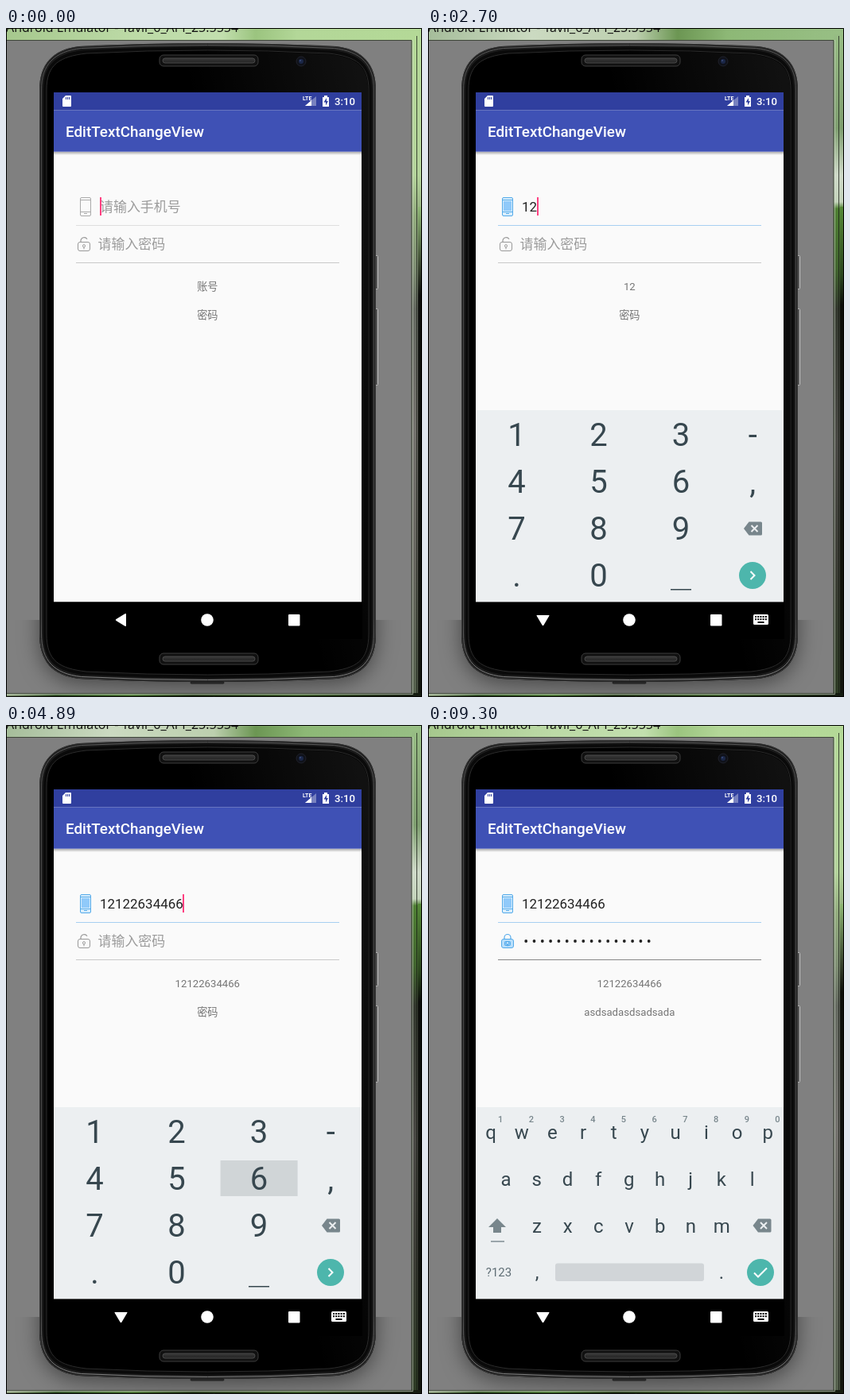
Recreate the animation shown at these times as an HTML page with a canvas. Size 523 by 842 pixels, loop 9.33 s.

```html
<!DOCTYPE html>
<html lang="zh-CN">
<head>
<meta charset="utf-8">
<title>EditTextChangeView</title>
<style>
html, body { margin: 0; width: 100%; height: 100%; overflow: hidden; background: #808080; }
canvas { display: block; width: 523px; height: 842px; }
</style>
</head>
<body>
<canvas id="stage" width="523" height="842"></canvas>
<script>
const ctx = document.getElementById('stage').getContext('2d');
const LOOP = 9330;
const SANS = 'Roboto, "Noto Sans CJK SC", "Noto Sans CJK", sans-serif';
const INK = '#37474f', KEY_GREY = '#78868c', TEAL = '#4db6ac', PINK = '#ff4081';
const PHONE = '12122634466', PASSWORD = 'asdsadasdsadsada';
const NAV_TOP = 722.5;

// [key, pressed at, released at]
const PRESSES = [
  ['1', 2070, 2130], ['2', 2640, 2700], ['1', 2970, 3030], ['2', 3360, 3420],
  ['2', 3570, 3660], ['6', 3750, 3810], ['3', 3930, 3990], ['4', 4080, 4140],
  ['4', 4290, 4350], ['6', 4440, 4500], ['6', 4590, 4650], ['4', 4740, 4800], ['6', 4890, 4950]
];
const CARET_FLIPS = [270, 720, 930, 1380, 1830, 2130, 2580, 2700, 5880, 6000,
  7590, 8040, 8490, 8940, 9210];
const FOCUS_MOVE = 5430, LETTERS_SHOWN = 5490, LAST_HIDDEN = 8490;
const NUM_ROWS = ['123-', '456,', '789', '.0'];
const NUM_X = [111.5, 214.5, 318, 408.3];
const rowY = r => 512 + 59 * r;

const ramp = (t, a, b) => Math.min(1, Math.max(0, (t - a) / (b - a)));

function rect(x, y, w, h, fill) {
  ctx.fillStyle = fill;
  ctx.fillRect(x, y, w, h);
}

function box(x, y, w, h, r, fill, stroke, width = 1) {
  ctx.beginPath();
  ctx.roundRect(x, y, w, h, r);
  paint(fill, stroke, width);
}

function circle(x, y, r, fill, stroke, width = 1) {
  ctx.beginPath();
  ctx.arc(x, y, r, 0, Math.PI * 2);
  paint(fill, stroke, width);
}

function shape(d, fill, stroke, width = 1) {
  const path = new Path2D(d);
  if (fill) { ctx.fillStyle = fill; ctx.fill(path); }
  if (stroke) { ctx.strokeStyle = stroke; ctx.lineWidth = width; ctx.stroke(path); }
}

function paint(fill, stroke, width) {
  if (fill) { ctx.fillStyle = fill; ctx.fill(); }
  if (stroke) { ctx.strokeStyle = stroke; ctx.lineWidth = width; ctx.stroke(); }
}

function text(str, x, y, size, fill, align = 'left', weight = 400, family = SANS) {
  ctx.font = `${weight} ${size}px ${family}`;
  ctx.textAlign = align;
  ctx.fillStyle = fill;
  ctx.fillText(str, x, y);
}

function gradient(x0, y0, x1, y1, stops) {
  const g = ctx.createLinearGradient(x0, y0, x1, y1);
  stops.forEach(([at, color]) => g.addColorStop(at, color));
  return g;
}

function glass(focused) {
  const top = focused
    ? [[0, '#a5bd9a'], [.25, '#cbdac1'], [.5, '#bccfae'], [.6, '#6c9653'], [.72, '#8db876'], [1, '#98bf85']]
    : [[0, '#a6c88d'], [.3, '#bcdaa6'], [.52, '#c2dfae'], [.6, '#9bc47f'], [.7, '#b3d798'], [1, '#b4d997']];
  const side = focused
    ? [[0, '#98bf85'], [.08, '#8cac7b'], [.15, '#7f9f70'], [.22, '#cfdac9'], [.26, '#c3d3ba'],
       [.27, '#4f8034'], [.36, '#42652f'], [.42, '#34392f'], [.62, '#4a4945'], [.8, '#3c3d36'], [1, '#2e3c25']]
    : [[0, '#b4d997'], [.22, '#b4d49b'], [.28, '#93ad7e'], [.36, '#7f8f74'], [.42, '#656a61'],
       [.6, '#74726e'], [.8, '#66665f'], [1, '#55614d']];
  const bottom = [[0, '#91a382'], [.12, '#35542a'], [.3, '#4d7738'], [.45, '#2a3d20'], [.7, '#3d5c2c'], [1, '#141a10']];
  rect(0, 0, 523, 16, gradient(0, 0, 523, 0, top));
  rect(510, 8, 13, 834, gradient(0, 0, 0, 842, side));
  rect(518, 225, 5, 617, gradient(0, 225, 0, 842, focused
    ? [[0, '#568a38'], [.14, '#2b451e'], [.2, '#0b0d0a'], [1, '#12150f']]
    : [[0, '#90b876'], [.12, '#39452f'], [.18, '#0d0f0c'], [1, '#12150f']]));
  rect(0, 837, 523, 5, gradient(0, 0, 523, 0, bottom));
}

function desktop(focus) {
  glass(false);
  if (focus > 0) {
    ctx.globalAlpha = focus;
    glass(true);
    ctx.globalAlpha = 1;
  }
  text('Android Emulator - Tavil_6_API_25:5554', 0, 5, 16, '#101010', 'left', 400, '"Open Sans", sans-serif');
  rect(1, 16, 509, 821, '#808080');
  box(.5, 15.5, 509.5, 822, 0, null, '#3e4639');
  rect(1, 838, 510, 1, 'rgba(225,235,220,.6)');
  rect(511, 15, 1, 824, 'rgba(225,235,220,.5)');
  rect(516, 10, 1, 832, 'rgba(20,25,18,.75)');
  box(.5, .5, 522, 841, 0, null, '#000');
}

function speaker(y) {
  box(193, y, 124, 14, 5, '#111', '#3d3d3d');
  box(197, y + 4, 116, 6, 3, gradient(0, y + 4, 0, y + 10, [[0, '#383838'], [1, '#242424']]), '#484848');
}

// Phone outline, drawn inset from its outer edge.
function outline(inset) {
  const l = 42 + inset, r = 465 - inset, t = 23 + inset, b = 819 - inset;
  return `M${l} 78C${l} 46 ${l + 16} ${t + 4} ${l + 50} ${t}Q253.5 ${t - 8} ${r - 50} ${t}` +
    `C${r - 16} ${t + 4} ${r} 46 ${r} 78V762C${r} 797 ${r - 16} ${b - 4} ${r - 50} ${b}` +
    `Q253.5 ${b + 8} ${l + 50} ${b}C${l + 16} ${b - 4} ${l} 797 ${l} 762Z`;
}

function handset() {
  ctx.save();
  ctx.beginPath();
  ctx.rect(1, 745, 509, 92);
  ctx.clip();
  ctx.shadowColor = 'rgba(0,0,0,.45)';
  ctx.shadowBlur = 26;
  ctx.shadowOffsetY = 6;
  shape(outline(0), '#111');
  ctx.restore();
  [[286, 42], [353, 96]].forEach(([y, h]) => box(464.5, y + .5, 3, h, 1, '#555', '#c4c4c4'));
  shape(outline(0), '#1b1b1b');
  shape(outline(.5), null, '#3a3a3a');
  shape(outline(2.5), null, gradient(0, 20, 0, 822, [[0, '#5c5c5c'], [.1, '#4a4a4a'], [.9, '#4a4a4a'], [1, '#858585']]));
  shape(outline(5), '#0a0a0a');
  shape(outline(9), '#000', '#2b2b2b');
  shape(outline(10), gradient(230, 80, 450, 30, [[0, 'rgba(255,255,255,0)'], [1, 'rgba(255,255,255,.07)']]));
  box(232, 823, 42, 2, 1, '#333', '#191919');
  speaker(34);
  speaker(787);
  circle(371, 42, 6, '#10121a', '#20222b');
  circle(371, 42, 3, '#1b2747');
  circle(370, 41, 1, '#3b4c79');
}

function appBars() {
  rect(60, 81, 387, NAV_TOP - 81, '#fafafa');
  rect(60, 156, 387, 4, gradient(0, 156, 0, 160, [[0, 'rgba(0,0,0,.3)'], [1, 'rgba(0,0,0,0)']]));
  rect(60, 81, 387, 22.5, '#303f9f');
  rect(60, 103.5, 387, 52.2, '#3f51b5');
  text('EditTextChangeView', 75, 136.7, 18.83, '#fff', 'left', 500);
  shape('M75 85H81Q82 85 82 86V98Q82 99 81 99H72Q71 99 71 98V89Z', '#fff');
  [75, 77, 79].forEach(x => rect(x, 87, 1, 3, '#303f9f'));
  text('LTE', 373, 91, 7, '#fff', 'left', 700);
  shape('M390 86V98H376Z', 'rgba(255,255,255,.35)');
  shape('M384 91V98H376Z', '#fff');
  shape('M400 85H404V87H406V99H398V87H400Z', '#fff');
  shape('M403 88L399.5 93.5H402V97.5L405 92H403Z', '#303f9f');
  text('3:10', 439, 97, 13.18, '#fff', 'right', 500);
}

function phoneIcon(active) {
  const line = active ? '#53aaea' : '#aaa';
  box(93.5, 213.5, 13, 23, 1.5, active ? '#d9eefc' : null, line);
  rect(94, 216, 12, 1, line);
  rect(94, 231, 12, 1, line);
  if (active) rect(95, 218, 10, 12, '#90cafa');
  rect(98, 233, 4, 1, line);
}

function lockIcon(active) {
  const line = active ? '#53aaea' : '#999';
  const x = active ? 92.5 : 90.5;
  box(x, 269.5, 15, 11, 2.5, active ? '#b9dffb' : null, line);
  shape(active ? 'M96 269V267.5A4 4 0 0 1 104 267.5V269' : 'M94 269V267.5A4.3 4.3 0 0 1 102 265.8', null, line, 1.2);
  if (active) box(96.5, 272.5, 7, 5, 1, '#86c5f8', line);
  circle(x + 7.5, 274.3, 1.6, active ? '#e5f4ff' : null, line);
  rect(x + 7, 276, 1, 2.5, line);
}

function maskedWidth(value, hidden) {
  return hidden * 10.3 + (hidden < value.length ? 9.2 : 0);
}

function form(t, number, secret) {
  phoneIcon(number);
  lockIcon(secret);
  rect(88, 248, 331, 1, number ? '#a6cff1' : '#dedede');
  rect(88, 295, 331, 1, secret ? '#868686' : '#c9c9c9');
  text(number || '请输入手机号', 118, 231, 16.94, number ? '#212121' : '#9b9b9b');
  const numberWidth = number ? ctx.measureText(number).width : 0;

  const hidden = t >= LAST_HIDDEN ? secret.length : Math.max(0, secret.length - 1);
  if (secret) {
    for (let i = 0; i < hidden; i++) circle(123.2 + i * 10.3, 272, 1.9, '#212121');
    text(secret.slice(hidden), 118 + hidden * 10.3, 278, 16.94, '#212121');
  } else {
    text('请输入密码', 115.5, 278, 16.94, '#9b9b9b');
  }
  text(number || '账号', 253.3, 329.6, 13.18, '#757575', 'center');
  text(secret || '密码', 253.3, 366, 13.18, '#757575', 'center');

  if (CARET_FLIPS.filter(f => f <= t).length % 2 === 0) {
    if (t < FOCUS_MOVE) rect(Math.floor(118 + numberWidth), 213, 2, 23, PINK);
    else rect(secret ? Math.round(118 + maskedWidth(secret, hidden)) - 1 : 116, 260, 2, 23, PINK);
  }
}

function backspace(x, y) {
  shape(`M${x - 11.5} ${y}L${x - 5} ${y - 8.5}H${x + 10}Q${x + 11.5} ${y - 8.5} ${x + 11.5} ${y - 7}V${y + 7}Q${x + 11.5} ${y + 8.5} ${x + 10} ${y + 8.5}H${x - 5}Z`, KEY_GREY);
  shape(`M${x - 2} ${y - 4}l8 8m0 -8l-8 8`, null, '#eceff1', 2);
}

function numberPad(t) {
  const press = PRESSES.find(p => t >= p[1] && t < p[2]);
  if (press) {
    const k = press[0] - 1;
    rect(63 + 103.3 * (k % 3), 489 + 59 * Math.floor(k / 3), 97, 45, '#d0d5d7');
  }
  NUM_ROWS.forEach((row, r) => [...row].forEach((c, i) =>
    text(c, NUM_X[i], rowY(r) + 14, 40, INK, 'center')));
  rect(305, 706, 26, 1.5, INK);
  backspace(408.5, 630);
  circle(408, 689, 17, t >= 5400 ? '#429d94' : TEAL);
  shape('M405.5 684L410.5 689L405.5 694', null, '#fff', 2);
}

function letterPad() {
  [['qwertyuiop', 79], ['asdfghjkl', 98], ['zxcvbnm', 137]].forEach(([row, x], r) =>
    [...row].forEach((c, i) => text(c, x + 38.7 * i, rowY(r) + 8.5, 24, INK, 'center')));
  [...'1234567890'].forEach((c, i) => text(c, 91.2 + 38.7 * i, 500, 11, KEY_GREY, 'center', 500));
  shape('M87 621L98 632H92V639H82V632H76Z', KEY_GREY);
  rect(79, 649, 17, 2, '#9aa5aa');
  backspace(420, 630);
  text('?123', 89, 694, 15, '#5f6e75', 'center');
  text(',', 137, 697, 24, INK, 'center');
  box(160, 677.5, 187, 22.5, 3, '#d1d5d8');
  text('.', 369, 697, 24, INK, 'center');
  circle(418, 689, 17, TEAL);
  shape('M410 689.5L415 694.5L426 683.5', null, '#fff', 2);
}

function keyboard(t) {
  const p = ramp(t, 780, 1110);
  if (p === 0) return;
  ctx.save();
  ctx.beginPath();
  ctx.rect(60, 481, 387, NAV_TOP - 481);
  ctx.clip();
  ctx.globalAlpha = p;
  ctx.translate(0, 48 * (1 - p) ** 2);
  rect(60, 481, 387, 242, '#eceff1');
  t < LETTERS_SHOWN ? numberPad(t) : letterPad();
  ctx.restore();
}

function navBar(open) {
  rect(60, NAV_TOP, 388, 769 - NAV_TOP, '#000');
  shape(open ? 'M137 739H152Q153 739 152.3 740L145.5 751.5Q144.5 753 143.5 751.5L136.7 740Q136 739 137 739Z'
    : 'M151 738V752Q151 753.5 149.5 752.7L138.5 746Q137 745 138.5 744L149.5 737.3Q151 736.5 151 738Z', '#fff');
  circle(253, 745, 7.8, '#fff');
  box(355, 738, 14.5, 14.5, 1, '#fff');
  if (!open) return;
  box(409, 738, 19, 13, 1.5, '#fff');
  for (let r = 0; r < 2; r++)
    for (let i = 0; i < 5; i++) rect(411 + i * 3.2, 740 + r * 3.2, 2, 2, '#000');
  rect(414.5, 747, 8, 2, '#000');
}

function secretLength(t) {
  if (t >= 6600) return Math.min(PASSWORD.length, 7 + Math.floor((t - 6600) / 60));
  return [6000, 6090, 6210, 6360, 6360, 6450].filter(at => at <= t).length;
}

function draw(t) {
  const digits = PRESSES.filter(p => p[2] <= t).length;
  desktop(ramp(t, 720, 960) * (1 - ramp(t, 9150, 9300)));
  handset();
  appBars();
  form(t, PHONE.slice(0, digits), PASSWORD.slice(0, secretLength(t)));
  keyboard(t);
  navBar(t >= 810);
}

function tick() {
  draw(Math.floor(performance.now() % LOOP / 30) * 30);
  requestAnimationFrame(tick);
}
tick();
</script>
</body>
</html>
```
